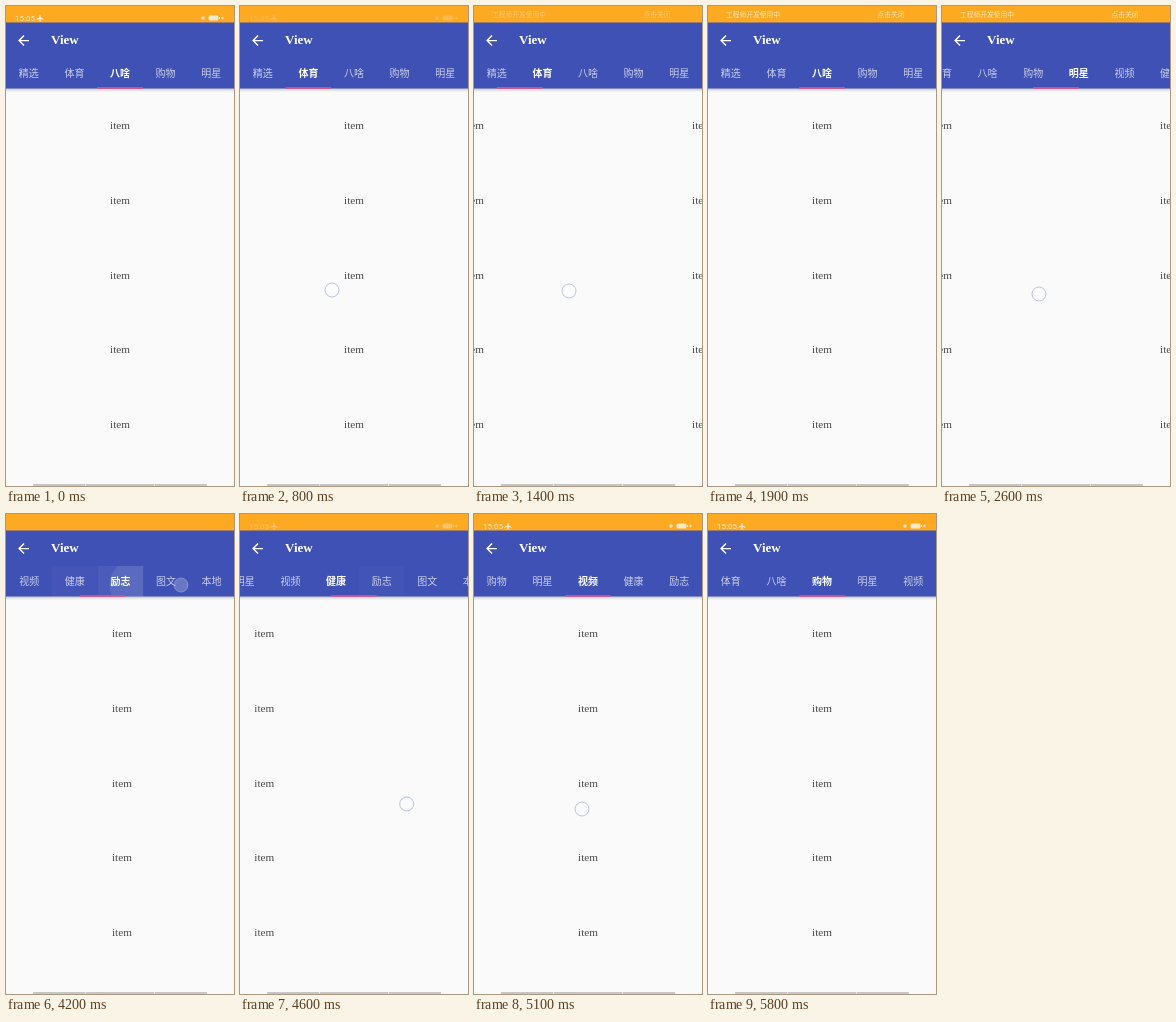
An HTML page that plays this animation: 228 px wide and 480 px high, repeating every 6100 ms.

```html
<!DOCTYPE html>
<html lang="zh-CN">
<head>
<meta charset="utf-8">
<title>View</title>
<style>
  html, body { margin: 0; width: 100%; height: 100%; overflow: hidden; background: #fafafa; }
  #stage { display: block; width: 100%; height: 100%; }
  text { fill: #fff; }
  .item { font: 11.2px "Liberation Serif", serif; fill: #484848; text-anchor: middle; }
  .title { font: bold 13px "Liberation Serif", serif; }
  .tab { font: 10px "Noto Sans CJK SC", "Noto Sans CJK", sans-serif; text-anchor: middle; fill-opacity: .72; }
  .tab.on { font-weight: bold; fill-opacity: 1; }
  .clock { font: 8px Roboto, sans-serif; }
  .notice { font: 6.75px "Noto Sans CJK SC", "Noto Sans CJK", sans-serif; fill: #fff3dc; fill-opacity: .85; }
</style>
</head>
<body>
<svg id="stage" viewBox="0 0 228 480">
  <defs>
    <linearGradient id="shade" x2="0" y2="1">
      <stop stop-color="#000" stop-opacity=".22"/>
      <stop offset="1" stop-color="#000" stop-opacity="0"/>
    </linearGradient>
  </defs>
  <rect width="228" height="480" fill="#fafafa"/>
  <g id="pages"></g>
  <rect y="82" width="228" height="4" fill="url(#shade)"/>
  <rect y="16" width="228" height="66.5" fill="#3f51b5"/>
  <rect width="228" height="16.5" fill="#fda921"/>
  <g id="clock" opacity=".75" fill="#fff">
    <text class="clock" x="9" y="15">15:05</text>
    <path d="M34 8.7l.7.7v1.9l2.8 1.7v.8l-2.8-.8v1.4l.9.7v.5l-1.6-.4-1.6.4v-.5l.9-.7V13l-2.8.8V13l2.8-1.7V9.4z"/>
    <circle cx="197" cy="12" r="1.7"/>
    <rect x="202.5" y="9.5" width="10" height="5" rx="1.5"/>
    <rect x="213" y="11" width="1" height="2"/>
    <path d="M215 11.6h1v-1h.8v1h1v.8h-1v1h-.8v-1h-1z"/>
  </g>
  <g id="notice">
    <text class="notice" x="18" y="11.2">工程师开发使用中</text>
    <text class="notice" x="169.5" y="11.2">点击关闭</text>
  </g>
  <path transform="translate(9.4 26.4) scale(.68)" fill="#fff"
    d="M20 11H7.83l5.59-5.59L12 4l-8 8 8 8 1.41-1.41L7.83 13H20z"/>
  <text class="title" x="45" y="38.3">View</text>
  <g id="tabs"></g>
  <path d="M27 479H201" stroke="#c6c6c6" stroke-width="2"/>
  <path d="M79.5 478v2M148.5 478v2" stroke="#e6e6e6"/>
  <circle id="dot" r="7" fill="#fff" fill-opacity=".22" stroke="#9aa5d8" stroke-opacity=".65" stroke-width="1"/>
</svg>
<script>
const LOOP = 6100, STEP = 100, WIDTH = 228, TAB = WIDTH / 5;
const names = ["精选", "体育", "八啥", "购物", "明星", "视频", "健康", "励志", "图文", "本地"];
const TAP = { x: 175, y: 71, local: 38, hold: 350, lag: 180, glide: 210, fade: 800 };

const swipe = (start, end, from, to, x, y) => ({ start, end, from, to, x, y });
const tap = (start, to) => ({ start, end: start + 317, from: to - 1, to, x: TAP.x, y: TAP.y, tap: true });
const moves = [
  swipe(400, 800, 2, 1, 88, 288),
  swipe(800, 1200, 1, 0, 92, 284),
  swipe(1200, 1600, 0, 1, 150, 285),
  swipe(1600, 1900, 1, 2, 152, 288),
  swipe(2000, 2400, 2, 3, 155, 290),
  swipe(2400, 2800, 3, 4, 152, 288),
  tap(3000, 5),
  tap(3550, 6),
  tap(3900, 7),
  swipe(4400, 4750, 7, 6, 100, 290),
  swipe(4750, 5100, 6, 5, 104, 293),
  swipe(5100, 5400, 5, 4, 108, 295),
  swipe(5400, 5700, 4, 3, 106, 292)
];

const clamp = (v, lo = 0, hi = 1) => Math.min(hi, Math.max(lo, v));
const ramp = (t, a, b) => clamp((t - a) / (b - a));
const smooth = u => u * u * (3 - 2 * u);
const $ = id => document.getElementById(id);

function make(parent, tag, attrs, text = "") {
  const el = document.createElementNS("http://www.w3.org/2000/svg", tag);
  set(el, attrs);
  el.textContent = text;
  return parent.appendChild(el);
}
function set(el, attrs) {
  for (const key in attrs) el.setAttribute(key, attrs[key]);
}

names.forEach((_, page) => {
  for (let row = 0; row < 5; row++)
    make($("pages"), "text", { class: "item", x: (page + .5) * WIDTH, y: 123 + row * 74.75 }, "item");
});

const tabs = names.map((name, i) => {
  const box = make($("tabs"), "svg", { x: i * TAB, y: 52, width: TAB, height: 30.5 });
  return {
    wash: make(box, "rect", { width: TAB, height: 31, fill: "#fff", opacity: 0 }),
    ripple: make(box, "circle", { cx: TAP.local, cy: TAP.y - 52, fill: "#fff", opacity: 0 }),
    label: make(box, "text", { class: "tab", x: TAB / 2, y: 18.7 }, name)
  };
});
const indicator = make($("tabs"), "rect", { y: 81, width: TAB, height: 1.6, fill: "#f0407f" });

// Tapped tabs move the underline later than the page.
function underlineAt(t) {
  let at = 2;
  for (const m of moves) {
    const a = m.tap ? m.start + TAP.lag : m.start;
    const b = m.tap ? a + TAP.glide : m.end;
    if (t >= a) at = m.from + (m.to - m.from) * smooth(ramp(t, a, b));
  }
  return at;
}

function drawRipples(t) {
  for (const m of moves.filter(m => m.tap)) {
    const age = t - m.start, { wash, ripple } = tabs[m.to];
    const active = age >= 0 && age < TAP.fade;
    set(wash, { opacity: active ? .06 * Math.min(1, 2 * (1 - age / TAP.fade)) : 0 });
    set(ripple, { r: clamp(age * .087, 0, 60), opacity: active ? .09 * (1 - ramp(age, 300, 400)) : 0 });
  }
}

function drawDot(t, move, u) {
  const visible = move && (move.tap ? t - move.start < TAP.hold : u < .6);
  set($("dot"), { visibility: visible ? "visible" : "hidden" });
  if (!visible) return;
  const drag = move.tap ? 0 : (move.from - move.to) * smooth(u) * 110;
  set($("dot"), { cx: move.x + drag, cy: move.y });
}

function draw(t) {
  const move = moves.filter(m => t >= m.start).pop();
  const u = move ? ramp(t, move.start, move.end) : 0;
  const pos = move ? move.from + (move.to - move.from) * smooth(u) : 2;
  const selected = move ? (u < .5 ? move.from : move.to) : 2;

  set($("pages"), { transform: `translate(${-pos * WIDTH} 0)` });
  set($("tabs"), { transform: `translate(${-clamp(pos - 2, 0, 5) * TAB} 0)` });
  set(indicator, { x: underlineAt(t) * TAB });
  tabs.forEach((tab, i) => tab.label.classList.toggle("on", i === selected));
  set($("clock"), { opacity: .75 * (1 - ramp(t, 500, 900) + ramp(t, 4400, 4900)) });
  set($("notice"), { opacity: ramp(t, 1000, 1800) - ramp(t, 3600, 4100) });
  drawRipples(t);
  drawDot(t, move, u);
}

const begin = performance.now();
function frame() {
  const t = (performance.now() - begin) % LOOP;
  draw(Math.floor(t / STEP) * STEP);
  requestAnimationFrame(frame);
}
frame();
</script>
</body>
</html>
```
